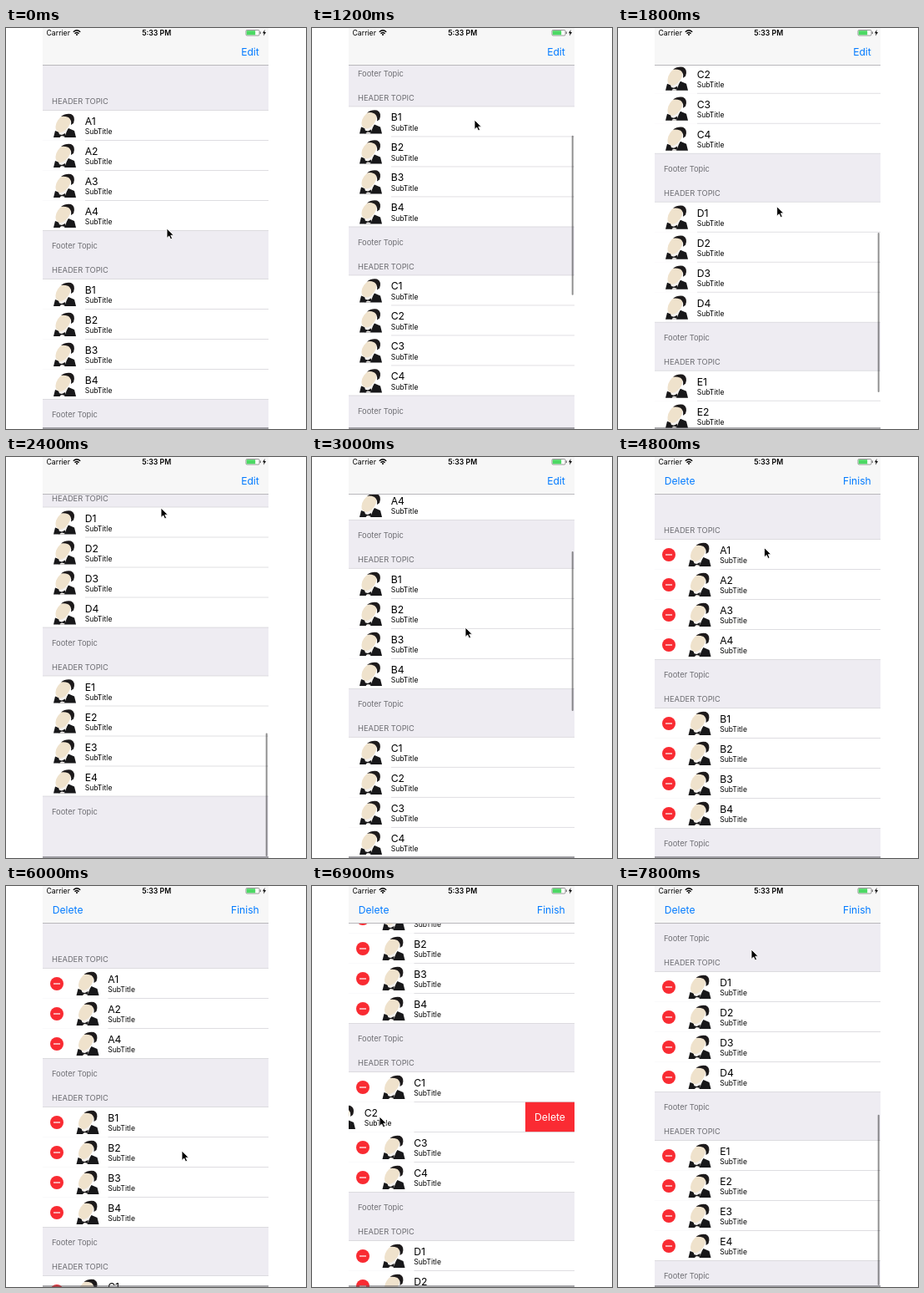
Write an HTML page that moves like this. It is 360 px wide and 480 px high and loops after 8000 ms.

```html
<!DOCTYPE html>
<html lang="en">
<head>
<meta charset="utf-8">
<title>Grouped list</title>
<style>
  html, body { margin: 0; width: 100%; height: 100%; overflow: hidden; background: #fff; }
  svg { display: block; }
  #stage { width: 100vw; height: 100vh; }
  text { font-family: Inter, Roboto, "Liberation Sans", sans-serif; white-space: pre; }
  .title { font-size: 12.2px; }
  .sub { font-size: 8.6px; }
  .topic { font-size: 9.3px; fill: #6d6d72; }
  .link { font-size: 12.1px; fill: #007aff; }
  .status { font-size: 8.7px; }
</style>
</head>
<body>
<svg id="stage" viewBox="0 0 360 480">
  <defs>
    <g id="avatar">
      <rect width="29" height="29" fill="#fff"/>
      <path d="M2 29 4 21 15 25 20 18 27 21 29 29Z" fill="#18181a"/>
      <path d="M8 22 19 19 15 29H10Z" fill="#f4f1ee"/>
      <path d="M8 25 12 26 16 24V28L12 27 8 29Z" fill="#18181a"/>
      <ellipse cx="13.500" cy="12.500" rx="7.500" ry="11.500" transform="rotate(35 13.500 12.500)" fill="#efe2cc"/>
      <path d="M11 4Q16 0 23 1 29 4 26 12L23 14Q24 8 20 5 15 3 11 4Z" fill="#1d1a1b"/>
    </g>
    <g id="minus">
      <circle r="8" fill="#f92b32"/>
      <path d="M-4 0H4" stroke="#fff" stroke-width="1.200"/>
    </g>
  </defs>
  <svg x="44" width="271" height="480" viewBox="44 0 271 480">
    <rect x="44" width="271" height="480" fill="#eeecf2"/>
    <g id="list"></g>
    <rect id="bar" x="311.700" width="2" rx="1" opacity=".43"/>
    <rect x="44" width="271" height="44" fill="#f7f7f7"/>
    <path d="M44 44.500H315" stroke="#b9b8bc"/>
    <text class="status" x="48.500" y="9">Carrier</text>
    <g fill="none" stroke="#000" stroke-width="1.300">
      <path d="M80.800 4.800Q85 .8 89.200 4.800M82.500 6.700Q85 4.300 87.500 6.700"/>
      <path d="M84 8H86"/>
    </g>
    <text class="status" x="180.700" y="9" text-anchor="middle" font-weight="600">5:33 PM</text>
    <rect x="288" y="2.500" width="16" height="6.500" rx="1.200" fill="#fff" stroke="#555" stroke-width=".6"/>
    <rect x="288.700" y="3.200" width="10.500" height="5.100" fill="#4cd964"/>
    <path d="M305.200 4.500V7" stroke="#555"/>
    <path d="M310.500 2 308 6.300H309.700L309 9.500 312 5H310.200Z"/>
    <text id="left" class="link" x="55.800" y="33">Delete</text>
    <text id="right" class="link" x="303.700" y="33" text-anchor="end"></text>
    <path d="M44 479H315" stroke="#55545a" stroke-width="1.200"/>
  </svg>
  <path id="cursor" d="M0 0V11.500L2.700 9 4.600 13 6.600 12.100 4.800 8.200H8.400Z" stroke="#fff" stroke-width=".9"/>
</svg>
<script>
const STEP = 300, LOOP = 8000, ROW = 36, GAP = 58, TOP = 98.5;
const PICK_AT = 3600, EDIT_AT = 4500;

// Scroll strokes: start, end, target offset
const strokes = [[471, 2400, 644.5], [2400, 3300, 0], [6000, 6600, 244], [7200, 7800, 530]];

// Places the pointer visits: time, x, y
const stops = [
  [0, 193, 240], [300, 195, 320], [1200, 195, 110], [1500, 193, 290], [2400, 186, 61],
  [PICK_AT, 182, 347], [EDIT_AT, 290, 29], [5100, 61, 188], [5400, 285, 188],
  [6000, 211, 317], [6600, 61, 276], [6900, 81, 276], [7200, 285, 276], [7800, 160, 76]
];

// When a row slides open and when it is removed
const swipes = { A3: { open: 5100, gone: 5700 }, C2: { open: 6900, gone: 7200 } };

const $ = id => document.getElementById(id);
const progress = (t, a, b) => Math.min(1, Math.max(0, (t - a) / (b - a)));
const ease = p => p * p * (3 - 2 * p);
const mix = (a, b, p) => a + (b - a) * p;

const scrollAt = t => strokes.reduce((y, [a, b, to]) => mix(y, to, ease(progress(t, a, b))), 0);

function pointerAt(t) {
  const i = stops.findIndex(s => s[0] >= t);
  const [b, bx, by] = stops[i], [a, ax, ay] = stops[Math.max(0, i - 1)];
  const p = a === b ? 1 : progress(t, a, b);
  return [mix(ax, bx, p), mix(ay, by, p)];
}

const line = (x, y) => `<path d="M${x} ${y}H315" stroke="#c8c7cc" stroke-width=".55"/>`;
const label = (cls, x, y, s) => `<text class="${cls}" x="${x}" y="${y}">${s}</text>`;

function row(name, y, t) {
  const editing = t >= EDIT_AT, x = editing ? 27.5 : 0;
  const open = t >= swipes[name]?.open;
  const picked = name === "B2" && t >= PICK_AT && !editing;
  return `<rect x="44" y="${y}" width="271" height="${ROW}" fill="${picked ? "#d5d5d5" : "#fff"}"/>
    <g transform="translate(${open ? -59.5 : 0} ${y})">
      ${editing ? '<use href="#minus" x="61" y="18.500"/>' : ""}
      <use href="#avatar" x="${55 + x}" y="3.500"/>
      ${label("title", 94.7 + x, 17.5, name)}${label("sub", 94.7 + x, 28.8, "SubTitle")}
    </g>` + (open ? `<rect x="256" y="${y}" width="59" height="${ROW}" fill="#fa2b33"/>
      <text class="title" x="285.500" y="${y + 22.3}" text-anchor="middle" fill="#fff">Delete</text>` : "");
}

function draw(t) {
  const scroll = scrollAt(t), editing = t >= EDIT_AT;
  let y = TOP - scroll, html = "", removed = 0;
  for (const s of "ABCDE") {
    const names = [1, 2, 3, 4].map(n => s + n).filter(n => !(t >= swipes[n]?.gone));
    const end = y + names.length * ROW;
    removed += 4 - names.length;
    html += label("topic", 55, y - 7.2, "HEADER TOPIC") + label("topic", 55, end + 21.8, "Footer Topic");
    names.forEach((n, i) => html += row(n, y + i * ROW, t));
    for (let i = 1; i < names.length; i++) html += line(editing ? 122.5 : 95, y + i * ROW);
    html += line(44, y) + line(44, end);
    y = end + GAP;
  }
  $("list").innerHTML = html;

  // The scroll bar shows while moving and shrinks when pulled past the end
  const max = 601 - ROW * removed, over = Math.max(0, scroll - max);
  const size = 191 * 1037 / (max + 436);
  const bar = $("bar");
  bar.setAttribute("y", 46 + Math.min(1, scroll / max) * (432 - size) + over);
  bar.setAttribute("height", size - over);
  bar.style.display = scroll !== scrollAt(t - STEP) ? "" : "none";

  $("left").style.display = editing ? "" : "none";
  $("right").textContent = editing ? "Finish" : "Edit";
  $("cursor").setAttribute("transform", `translate(${pointerAt(t)})`);
}

let shown = -1;
function tick() {
  const t = Math.floor(performance.now() % LOOP / STEP) * STEP;
  if (t !== shown) draw(shown = t);
  requestAnimationFrame(tick);
}
tick();
</script>
</body>
</html>
```
